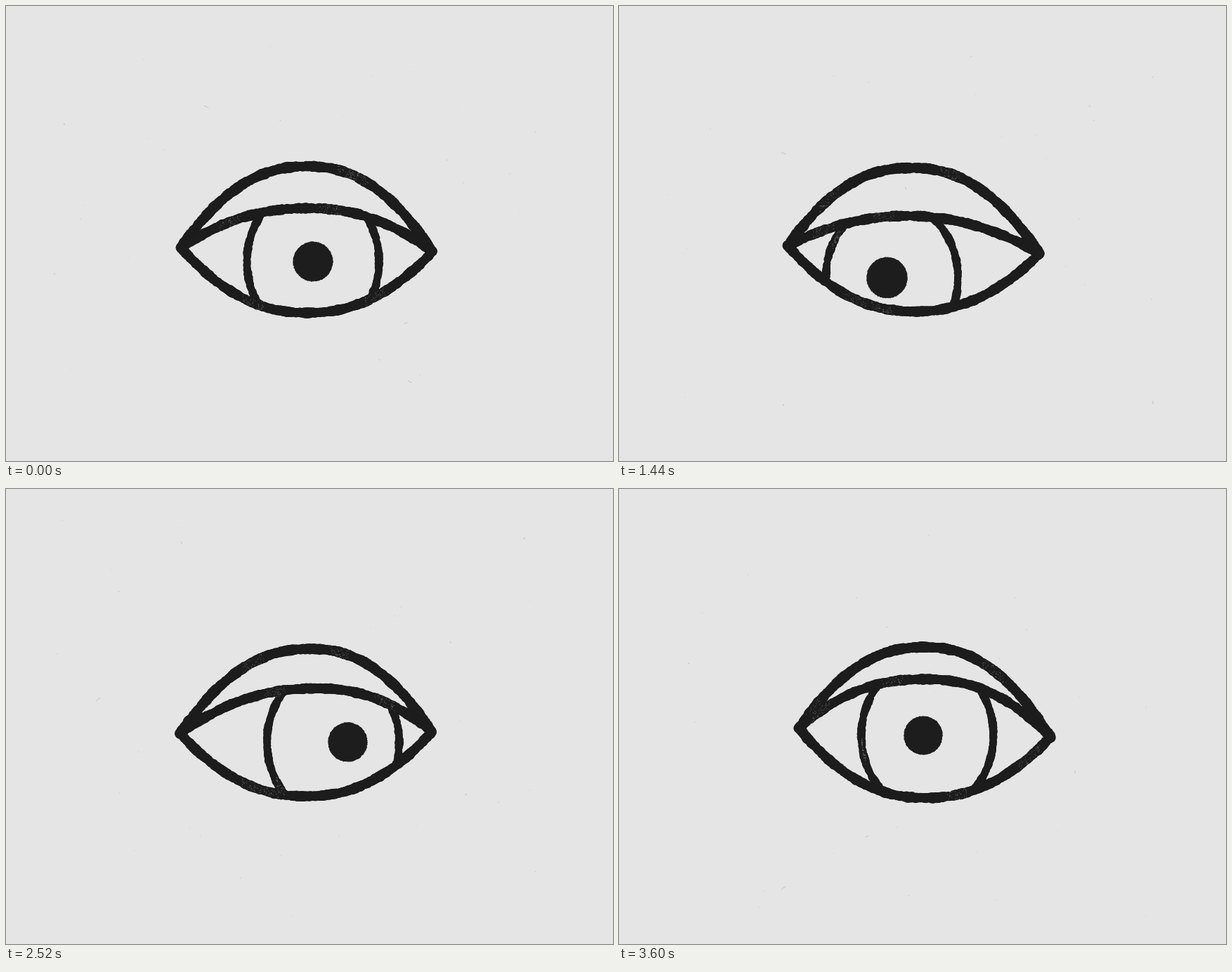
An HTML page with a canvas that plays this animation: 864x648 px, repeating every 3780 ms.

```html
<!DOCTYPE html>
<html lang="en">
<head>
<meta charset="utf-8">
<title>Looking around</title>
<style>
  html, body { margin: 0; width: 100%; height: 100%; overflow: hidden; background: #e5e5e5; }
  canvas { display: block; }
</style>
</head>
<body>
<canvas id="stage" width="864" height="648"></canvas>
<script>
const ctx = document.getElementById('stage').getContext('2d');
const PAPER = '#e5e5e5', INK = '#1d1d1d';
const STEP_MS = 180, STEPS = 21;
const HALF_WIDTH = 179, CORNER_Y = 347;
const IRIS_RX = 94, IRIS_RY = 108;
const LID_OPEN = 259, LID_TRAVEL = 80;

// The gaze: ahead, left, down, far left, right, far right, ahead.
const KEYS = [
  { step: 0,  eyeX: 428, tilt: 6,  lidY: 288, irisX: 437, pupilX: 437, pupilY: 364 },
  { step: 3,  eyeX: 423, tilt: -1, lidY: 266, irisX: 397, pupilX: 401, pupilY: 345 },
  { step: 6,  eyeX: 421, tilt: 9,  lidY: 339, irisX: 407, pupilX: 400, pupilY: 425 },
  { step: 10, eyeX: 418, tilt: 13, lidY: 259, irisX: 370, pupilX: 363, pupilY: 349 },
  { step: 12, eyeX: 426, tilt: -2, lidY: 294, irisX: 453, pupilX: 464, pupilY: 369 },
  { step: 16, eyeX: 428, tilt: -3, lidY: 274, irisX: 478, pupilX: 509, pupilY: 352 },
  { step: 20, eyeX: 435, tilt: 13, lidY: 271, irisX: 439, pupilX: 433, pupilY: 351 }
];

function makeRandom(seed) {
  let s = seed * 7919 + 17;
  return () => {
    s = (s + 0x6d2b79f5) | 0;
    let t = Math.imul(s ^ (s >>> 15), 1 | s);
    t = (t + Math.imul(t ^ (t >>> 7), 61 | t)) ^ t;
    return ((t ^ (t >>> 14)) >>> 0) / 4294967296;
  };
}

function poseAt(step) {
  const next = Math.max(1, KEYS.findIndex(key => key.step >= step));
  const from = KEYS[next - 1], to = KEYS[next];
  const p = (step - from.step) / (to.step - from.step);
  const ease = p * p * (3 - 2 * p);
  const pose = {};
  for (const name in from) pose[name] = from[name] + (to[name] - from[name]) * ease;
  return pose;
}

// An arc between the eye corners over an apex; a higher power has fuller shoulders.
function arcPoints({ eyeX, tilt }, apexX, apexY, power) {
  const left = eyeX - HALF_WIDTH, right = eyeX + HALF_WIDTH;
  const points = [];
  for (let x = left; x <= right; x++) {
    const side = x < apexX ? -1 : 1;
    const u = (x - apexX) / (eyeX + side * HALF_WIDTH - apexX);
    points.push([x, apexY + (CORNER_Y + side * tilt / 2 - apexY) * u ** power]);
  }
  return points;
}

function ellipsePoints(x, y, rx, ry) {
  const count = Math.ceil(Math.PI * (rx + ry));
  return Array.from({ length: count }, (_, i) => {
    const a = i / count * Math.PI * 2;
    return [x + rx * Math.cos(a), y + ry * Math.sin(a)];
  });
}

function tracePath(points) {
  ctx.beginPath();
  for (const [x, y] of points) ctx.lineTo(x, y);
  ctx.closePath();
}

function inkStroke(points, width, random) {
  const phase = random() * 6.28;
  ctx.fillStyle = INK;
  points.forEach(([x, y], i) => {
    const swell = .4 * Math.sin(i * .17 + phase);
    const r = width / 2 - .9 + swell + random() * 1.3;
    ctx.beginPath();
    ctx.arc(x + random() - .5, y + random() - .5, r, 0, Math.PI * 2);
    ctx.fill();
  });
  // Worn patches where the ink is thin.
  ctx.fillStyle = 'rgba(229,229,229,.22)';
  for (let patch = 0; patch < 2; patch++) {
    const start = Math.floor(random() * (points.length - 30));
    for (let i = 0; i < 45; i++) {
      const [x, y] = points[start + Math.floor(random() * 30)];
      ctx.fillRect(x, y + (random() - .5) * width, 1.2, 1.2);
    }
  }
}

function drawPupil(x, y, r, random) {
  const rough = ellipsePoints(x, y, r, r).map(([px, py]) => [px + random() - .5, py + random() - .5]);
  ctx.fillStyle = INK;
  tracePath(rough);
  ctx.fill();
}

function drawDust(random) {
  const place = () => [65 + random() * 710, 35 + random() * 580];
  for (let i = 0; i < 34; i++) {
    ctx.fillStyle = `rgba(60,60,60,${.04 + .16 * random() ** 2})`;
    ctx.fillRect(...place(), 1 + random(), 1 + random());
  }
  ctx.strokeStyle = 'rgba(60,60,60,.2)';
  for (let i = 0; i < 3; i++) {
    const [x, y] = place();
    const dx = random() * 14 - 7, dy = random() * 14 - 7;
    ctx.beginPath();
    ctx.moveTo(x, y);
    ctx.quadraticCurveTo(x + dx * .8, y + dy * .3, x + dx, y + dy);
    ctx.stroke();
  }
}

function draw(step) {
  const random = makeRandom(step + 1);
  const pose = poseAt(step);
  const { eyeX, lidY, irisX, pupilX, pupilY } = pose;
  const closed = (lidY - LID_OPEN) / LID_TRAVEL;
  const glance = pupilX - eyeX;

  // The crease and the lower rim follow the lid a little.
  const crease = arcPoints(pose, eyeX + glance * .1, 223 + closed * 15, 2.25);
  const lid = arcPoints(pose, eyeX + glance * .25, lidY, 2.3 - closed ** 2);
  const lower = arcPoints(pose, eyeX, 442 - closed * 14, 2.2);

  ctx.fillStyle = PAPER;
  ctx.fillRect(0, 0, 864, 648);
  drawDust(random);

  ctx.save();
  tracePath([...lid, ...lower.slice().reverse()]);
  ctx.clip();
  drawPupil(pupilX, pupilY, 27.5 + closed ** 2 * 7, random);
  inkStroke(ellipsePoints(irisX, pupilY, IRIS_RX, IRIS_RY), 11, random);
  ctx.restore();

  inkStroke(crease, 14.5, random);
  inkStroke(lid, 14, random);
  inkStroke(lower, 14, random);
}

let shown = -1;
const started = performance.now();

function tick() {
  const step = Math.floor((performance.now() - started) / STEP_MS) % STEPS;
  if (step !== shown) draw(shown = step);
  requestAnimationFrame(tick);
}
tick();
</script>
</body>
</html>
```
